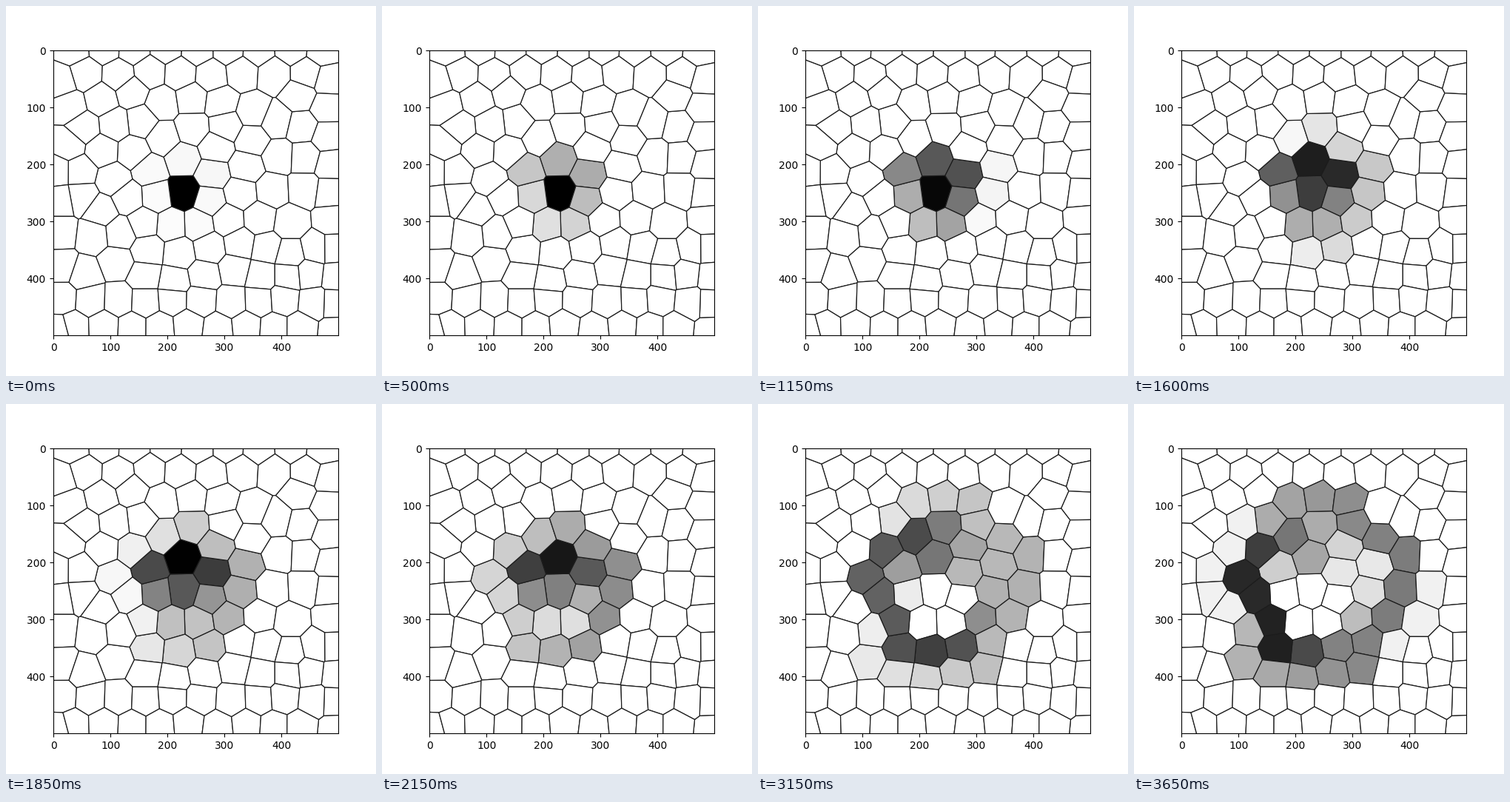
Write a matplotlib script that moves like this. It is 500 px wide and 500 px high and loops after 3.75 s.

```python
import numpy as np
import matplotlib.pyplot as plt
from matplotlib.animation import FuncAnimation
from matplotlib.collections import PolyCollection

SCALE, LEFT, TOP = 0.77, 63.75, 60
CENTRE = (240, 252)
rng = np.random.default_rng(4)

# Cells the wave reaches, ring by ring, in stage pixels
FIRST = [(239, 207), (279, 227), (275, 263), (260, 295), (223, 296), (203, 257), (194, 222)]
SECOND = [(212, 178), (252, 165), (284, 191), (325, 217), (317, 253), (300, 289), (275, 327),
          (234, 334), (192, 330), (186, 293), (165, 259), (145, 234), (172, 197)]
THIRD = [(183, 156), (211, 131), (251, 125), (290, 130), (297, 162), (333, 181), (369, 203),
         (360, 249), (343, 287), (316, 321), (309, 356), (268, 364), (227, 372), (188, 365),
         (149, 346), (154, 307)]
FOURTH = [(147, 160), (130, 195), (100, 223), (102, 258), (128, 277), (403, 247), (384, 293),
          (352, 327)]


def swing(mean, size=0, axis=0):
    """A value that varies with direction, largest towards axis (degrees)."""
    return lambda phi: mean + size * np.cos(phi - np.radians(axis))


def ring(points, onset, rise=swing(11.5), peak=swing(40), fall=9.5):
    """Rows of onset, rise per step, peak step and fall per step, one column per cell."""
    dx, dy = (np.array(points, float) - CENTRE).T
    phi = np.arctan2(dy, dx)
    return np.array([onset(phi), rise(phi), peak(phi), np.full(len(phi), fall)])


def line(x0, y0, x1, y1, n):
    """Evenly spaced seeds, slightly shaken."""
    return np.linspace((x0, y0), (x1, y1), n) + rng.uniform(-3, 3, (n, 2))


def surround():
    return np.vstack([
        line(88, 58, 425, 58, 9),        # top edge and the row below
        line(109, 91, 404, 91, 8),
        line(88, 133, 170, 117, 3),      # left side
        line(73, 100, 73, 100, 1),
        line(107, 164, 85, 190, 2),
        line(70, 220, 74, 440, 6),
        line(115, 311, 106, 360, 2),
        line(332, 143, 402, 164, 3),     # right side
        line(394, 118, 405, 207, 2),
        line(434, 99, 448, 441, 10),
        line(384, 338, 418, 328, 2),
        line(345, 364, 413, 364, 3),     # bottom rows
        line(113, 398, 416, 398, 9),
        line(92, 434, 400, 434, 9),
    ])


def clip(poly, mid, normal):
    """Keep the part of poly on the near side of the line through mid."""
    side = (poly - mid) @ normal
    out = []
    for i in range(len(poly)):
        a, b, sa, sb = poly[i - 1], poly[i], side[i - 1], side[i]
        if sa * sb < 0:
            out.append(a + (b - a) * sa / (sa - sb))
        if sb <= 0:
            out.append(b)
    return np.array(out)


def voronoi(seeds):
    box = np.array([(30, 30), (480, 30), (480, 480), (30, 480)], float)
    cells = []
    for s in seeds:
        poly = box
        for j in np.argsort(np.hypot(*(seeds - s).T))[1:25]:
            poly = clip(poly, (s + seeds[j]) / 2, seeds[j] - s)
        cells.append((poly - (LEFT, TOP)) / SCALE - 0.5)
    return cells


waves = np.hstack([
    ring([CENTRE], swing(-10.5), swing(25), swing(10.5), fall=13.5),
    ring(FIRST, swing(-0.5), swing(10.5, 5, -55), swing(15.5, 3.5, -145)),
    ring(SECOND, swing(13.2, 3.2, 180), peak=swing(29.5, 7, 165)),
    ring(THIRD, swing(25.9, 3, 180), swing(11)),
    ring(FOURTH, swing(33.8)),
])


def greys(k):
    onset, rise, peak, fall = waves
    top = np.minimum(255, rise * (peak - onset))
    dark = np.minimum(rise * (k - onset), top - fall * (k - peak))
    return 1 - np.clip(dark, 0, 255) / 255


# 36 steps of 100 ms, three of them held half as long again
holds = np.full(35, 100)
holds[[10, 11, 15]] = 150
starts = np.concatenate([[0], np.cumsum(holds)])

seeds = np.vstack([[CENTRE], FIRST, SECOND, THIRD, FOURTH, surround()])
shades = np.ones(len(seeds))

fig, ax = plt.subplots(figsize=(5, 5), dpi=100)
ax.set_aspect("equal")
ax.set_xlim(-0.5, 499.5)
ax.set_ylim(499.5, -0.5)
ax.set_xticks(range(0, 500, 100))
ax.set_yticks(range(0, 500, 100))
mesh = PolyCollection(voronoi(seeds), edgecolors="#1c1c1c", linewidths=0.9)
ax.add_collection(mesh, autolim=False)


def draw(frame):
    k = np.searchsorted(starts, frame * 50, side="right") - 1
    shades[:waves.shape[1]] = greys(k)
    mesh.set_facecolor(np.column_stack([shades] * 3))
    return (mesh,)


anim = FuncAnimation(fig, draw, frames=75, interval=50, repeat=True)
plt.show()
```
